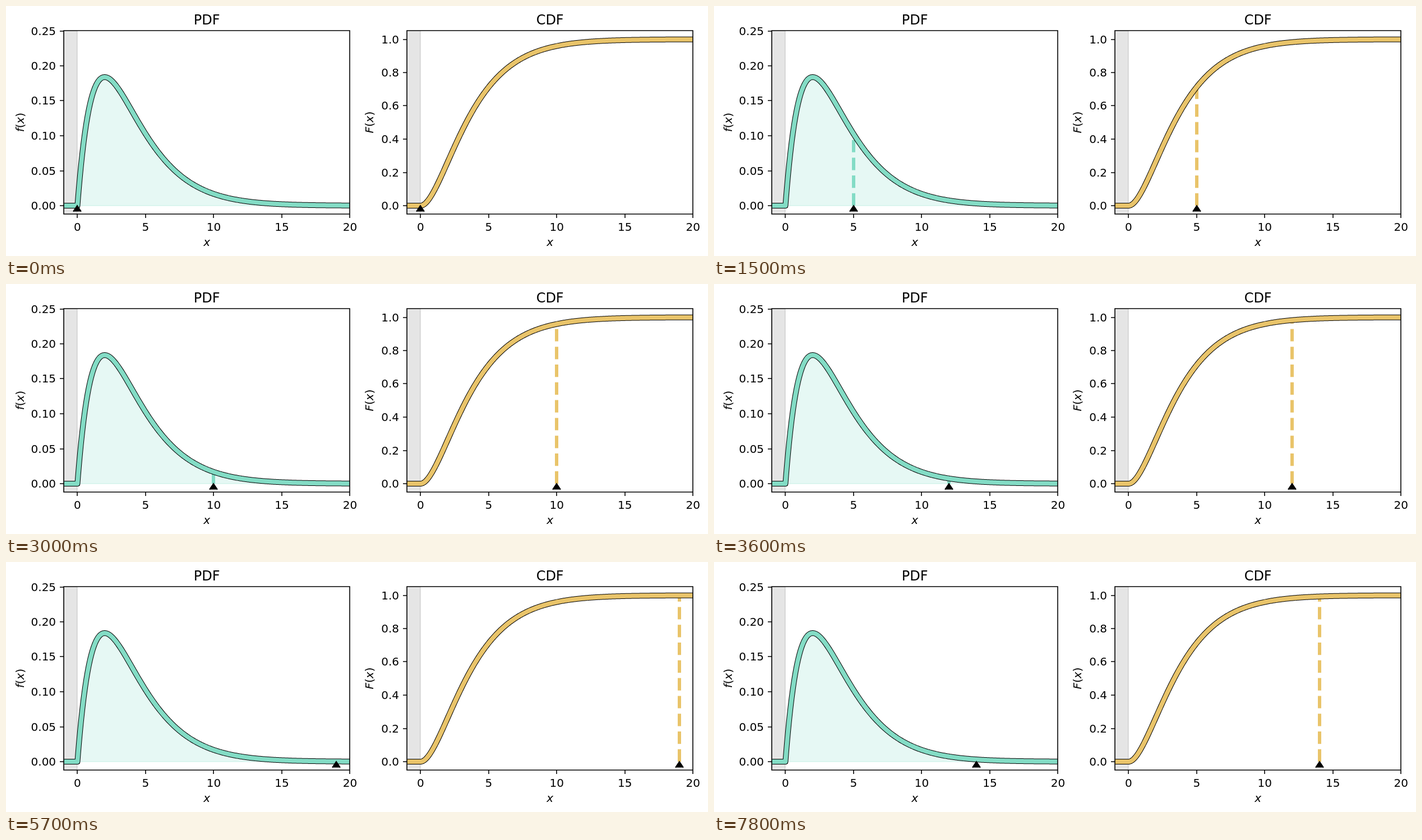
Recreate the animation shown at these times as an HTML page. Size 1252x447 px, loop 8 s.

```html
<!DOCTYPE html>
<html lang="en">
<head>
<meta charset="utf-8">
<title>PDF and CDF</title>
<style>
  html, body { margin: 0; width: 100%; height: 100%; overflow: hidden; background: #fff; }
  svg { display: block; }
  text { font: 20px "DejaVu Sans", sans-serif; }
  .title { font-size: 24px; }
  .i { font-style: oblique; }
  .mid { text-anchor: middle; }
  .end { text-anchor: end; }
  .frame { fill: none; stroke: #000; stroke-width: 1.6; }
  .curve { fill: none; stroke-linejoin: round; }
  .dash { stroke-width: 6; stroke-dasharray: 22.2 9.6; }
  .band { fill: #000; stroke: #000; stroke-width: 2; opacity: 1; fill-opacity: .1; stroke-opacity: .1; }
  .area { fill-opacity: .2; stroke-opacity: .2; stroke-width: 2; }
  .caret { stroke: #000; stroke-width: 2; stroke-miterlimit: 10; }
</style>
</head>
<body>
<svg id="stage" width="1252" height="447" viewBox="0 0 1252 447"></svg>
<script>
const TOP = 44, BOTTOM = 372, ZERO = 357, UNIT = 24.3;
const STEP = 300, LOOP = 8000, PEAK = 20;

const plots = [
  { title: 'PDF', name: 'f', left: 103.1, labelX: 31.5, color: '#83dcc5', scale: 1250, tick: .05, ticks: 6, digits: 2, area: true,
    fn: x => x < 0 ? 0 : x / 4 * Math.exp(-x / 2) },
  { title: 'CDF', name: 'F', left: 715, labelX: 654.5, color: '#e9c46a', scale: 297.5, tick: .2, ticks: 6, digits: 1,
    fn: x => x < 0 ? 0 : 1 - Math.exp(-x / 2) * (1 + x / 2) }
];

const px = (p, x) => p.left + (x + 1) * UNIT;
const py = (p, v) => ZERO - v * p.scale;

function trace(p, from) {
  const points = [];
  for (let i = from * 20; i <= 400; i++) {
    points.push(px(p, i / 20).toFixed(2) + ' ' + py(p, p.fn(i / 20)).toFixed(2));
  }
  return 'M' + points.join('L');
}

function drawPlot(p, n) {
  const left = Math.round(p.left), right = Math.round(px(p, 20));
  const middle = (p.left + px(p, 20)) / 2;
  const line = trace(p, -1);
  let ticks = '', labels = '';
  for (let x = 0; x <= 20; x += 5) {
    const at = Math.round(px(p, x));
    ticks += `M${at} ${BOTTOM}v7`;
    labels += `<text class="mid" x="${px(p, x)}" y="401.5">${x}</text>`;
  }
  for (let i = 0; i < p.ticks; i++) {
    const at = Math.round(py(p, i * p.tick));
    ticks += `M${left} ${at}h-7`;
    labels += `<text class="end" x="${p.left - 14}" y="${at + 7.3}">${(i * p.tick).toFixed(p.digits)}</text>`;
  }
  const area = p.area
    ? `<path class="area" fill="${p.color}" stroke="${p.color}" d="${trace(p, 0)}V${ZERO}H${px(p, 0)}Z"/>` : '';
  return `
    <clipPath id="clip${n}"><path d="M${left} ${TOP}H${right}V${BOTTOM}H${left}Z"/></clipPath>
    <g clip-path="url(#clip${n})">
      <path class="band" d="M${left} ${TOP}H${Math.round(px(p, 0))}V${BOTTOM}H${left}Z"/>
      ${area}
      <path class="dash" id="dash${n}" stroke="${p.color}"/>
      <path class="curve" stroke="#000" stroke-width="10" d="${line}"/>
      <path class="curve" stroke="${p.color}" stroke-width="8" d="${line}"/>
      <path class="caret" id="caret${n}" d="M-7 10.5L0 0L7 10.5"/>
    </g>
    <path class="frame" d="M${left} ${TOP}H${right}V${BOTTOM}H${left}Z${ticks}"/>
    ${labels}
    <text class="title mid" x="${middle}" y="33">${p.title}</text>
    <text class="mid i" x="${middle}" y="428.5">x</text>
    <text class="mid" transform="translate(${p.labelX} 208) rotate(-90)"><tspan class="i">${p.name}</tspan>(<tspan class="i">x</tspan>)</text>`;
}

const byId = id => document.getElementById(id);
byId('stage').innerHTML = plots.map(drawPlot).join('');

function render(now) {
  const k = Math.floor(now % LOOP / STEP);
  const x = PEAK - Math.abs(PEAK - k);
  plots.forEach((p, n) => {
    const at = Math.round(px(p, x));
    byId('dash' + n).setAttribute('d', `M${at} ${ZERO}V${py(p, p.fn(x))}`);
    byId('caret' + n).setAttribute('transform', `translate(${at} ${ZERO})`);
  });
}

const start = performance.now();
function loop() {
  render(performance.now() - start);
  requestAnimationFrame(loop);
}
loop();
</script>
</body>
</html>
```
